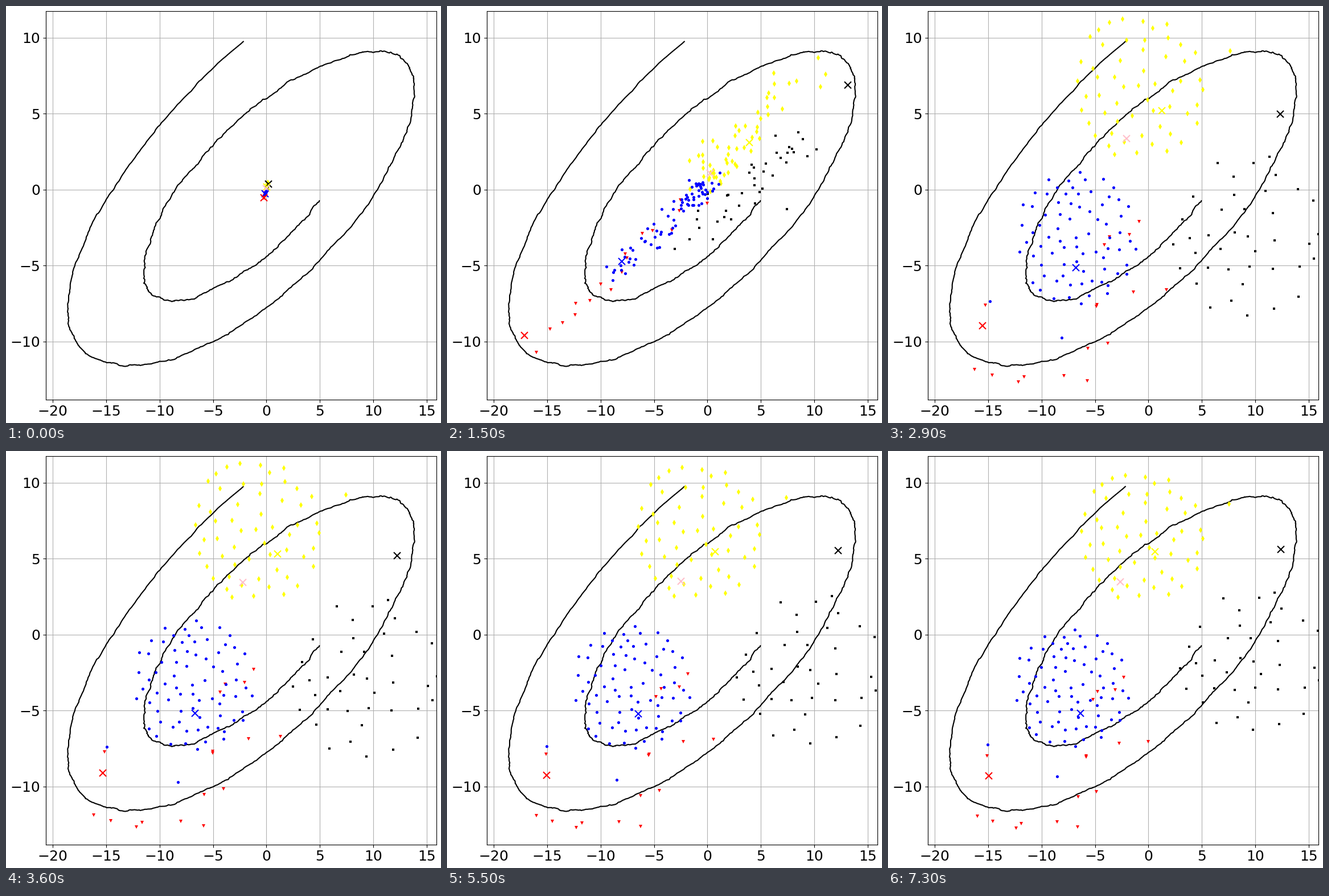
Animation of 764 by 733 pixels, one loop 7.4 s. Source, as a matplotlib script:

```python
import numpy as np
import matplotlib.pyplot as plt
from matplotlib.animation import FuncAnimation

W, H, DPI = 764, 733, 100
STEP, FRAMES = 100, 74
LEFT, TOP, RIGHT, BOTTOM = 69.5, 8.5, 755.5, 691.5
CENTRE = np.array([457.3, 322.6])
UNIT = np.array([18.757, -26.7])
KEYS = [1500, 2300, 2900, 4300, 7300]
rng = np.random.default_rng(12)


def to_data(p):
    return (np.asarray(p, float) - CENTRE) / UNIT


def spiral():
    """Skewed spiral with a mean-reverting random wobble."""
    radii = [8.8, 9.2, 9.4, 10.5, 10.9, 10.8, 10.8, 11.1, 11.6, 12.6, 14.1,
             14.5, 15.0, 15.7, 16.0, 16.4, 16.7, 18.0, 18.7, 19.7, 21.1]
    a = np.linspace(0.884, 10.921, 900)
    r = np.interp(a, np.linspace(a[0], a[-1], len(radii)), radii)
    r = np.convolve(np.pad(r, 20, mode="reflect", reflect_type="odd"),
                    np.ones(41) / 41, mode="valid")
    x = r * np.cos(a)
    y = 0.488 * x - 0.502 * r * np.sin(a)
    wobble = np.zeros((len(a), 2))
    for i in range(1, len(a)):
        wobble[i] = 0.9 * wobble[i - 1] + rng.normal(0, 0.03, 2)
    return x - 0.62 + wobble[:, 0], y - 0.05 + 0.7 * wobble[:, 1]


def disc(n, strays=()):
    """Evenly spread random points in the unit disc, plus a few strays."""
    pts = [np.zeros(2)]
    while len(pts) < n:
        a = rng.uniform(0, 2 * np.pi, 8)
        tries = np.sqrt(rng.uniform(0, 1, (8, 1))) * np.c_[np.cos(a), np.sin(a)]
        gaps = np.linalg.norm(tries[:, None] - np.array(pts), axis=2).min(1)
        pts.append(tries[gaps.argmax()])
    return np.array(pts + [np.array(s) for s in strays])


def arc():
    """Pairs of points strung along a bent path in the unit square."""
    knots = [(0.88, -1), (0.55, -0.74), (1, -0.21), (0.32, 0.08),
             (0.34, 0.46), (0.21, 0.74), (-0.55, 0.68), (-1, 0.83)]
    pts = np.repeat(knots, 2, axis=0)
    return np.vstack([pts + rng.normal(0, 0.1, pts.shape), (-0.91, -0.01)])


def cloud(unit, start, end, power, spread, boxes):
    """Key places: a streak from start to end, then the shape in each box."""
    start, end = np.array(start), np.array(end)
    rank = (unit @ (end - start)).argsort().argsort() / (len(unit) - 1)
    streak = start + (end - start) * rank[:, None] ** power
    streak = streak + rng.normal(0, spread, unit.shape)
    shapes = [unit * (rx, ry) + (cx, cy) for cx, cy, rx, ry in boxes]
    return np.array([streak] + shapes)


def pose(keys, t):
    """Places at time t: a burst out of the centre, then drift between keys."""
    if t < KEYS[0]:
        times = [0, 300, 700, 1100, 1500]
        sx = np.interp(t, times, [0.013, 0.45, 1.03, 1.08, 1])
        sy = np.interp(t, times, [0.055, 0.65, 1.42, 1.30, 1])
        return CENTRE + (keys[0] - CENTRE) * (sx, sy)
    i = min(np.searchsorted(KEYS, t, side="right") - 1, len(KEYS) - 2)
    q = (t - KEYS[i]) / (KEYS[i + 1] - KEYS[i])
    if i == 0:
        q = q * q * (3 - 2 * q)
    return keys[i] + (keys[i + 1] - keys[i]) * q


# colour, marker, size, key places
GROUPS = [
    ("black", "s", 3.5, cloud(
        disc(39), (435, 398), (640, 228), 1.0, 20,
        [(624, 400, 140, 138), (632, 405, 132, 147),
         (636, 395, 130, 142), (642, 370, 130, 127)])),
    ("yellow", "d", 4.6, cloud(
        disc(56, [(1.34, -0.47)]), (460, 290), (635, 115), 2.2, 19,
        [(450, 165, 120, 128), (440, 140, 120, 130),
         (437, 135, 117, 128), (444, 148, 116, 117)])),
    ("red", "v", 4.0, cloud(
        arc(), (441, 332), (165, 595), 1.0, 12,
        [(298, 518, 160, 166), (307, 528, 149, 162),
         (303, 533, 141, 157), (295, 538, 133, 152)])),
    ("blue", "o", 3.7, cloud(
        disc(76, [(-1.4, 0.96), (-0.23, 1.5)]), (455, 315), (285, 475), 2, 13,
        [(343, 400, 103, 116), (330, 407, 108, 117),
         (324, 414, 107, 112), (321, 416, 104, 104)])),
]

# Cross markers: one place per key time
CROSSES = {
    "black": [(704, 139), (713, 194), (689, 190), (685, 177), (690, 173)],
    "yellow": [(531, 240), (503, 198), (481, 184), (473, 177), (469, 177)],
    "pink": [(462, 294), (436, 245), (419, 233), (413, 229), (408, 230)],
    "blue": [(307, 449), (320, 453), (330, 460), (334, 462), (338, 461)],
    "red": [(136, 579), (145, 551), (166, 562), (174, 570), (177, 571)],
}

fig = plt.figure(figsize=(W / DPI, H / DPI), dpi=DPI, facecolor="white")
ax = fig.add_axes([LEFT / W, 1 - BOTTOM / H,
                   (RIGHT - LEFT) / W, (BOTTOM - TOP) / H])
(x0, y0), (x1, y1) = to_data([(LEFT, BOTTOM), (RIGHT, TOP)])
ax.set(xlim=(x0, x1), ylim=(y0, y1),
       xticks=range(-20, 16, 5), yticks=range(-10, 11, 5))
ax.tick_params(labelsize=18)
ax.set_axisbelow(True)
ax.grid(True)
ax.plot(*spiral(), color="black", lw=1.5)

movers = []
for color, marker, size, keys in GROUPS:
    dots, = ax.plot([], [], marker, color=color, ms=size, mew=0)
    movers.append((dots, keys))
for color, places in CROSSES.items():
    cross, = ax.plot([], [], "x", color=color, ms=8.8, mew=1.5)
    movers.append((cross, np.array(places, float)[:, None]))


def draw(n):
    for artist, keys in movers:
        artist.set_data(*to_data(pose(keys, n * STEP)).T)
    return [artist for artist, _ in movers]


anim = FuncAnimation(fig, draw, frames=FRAMES, interval=STEP,
                     repeat=True, repeat_delay=0, blit=False)
plt.show()
```
